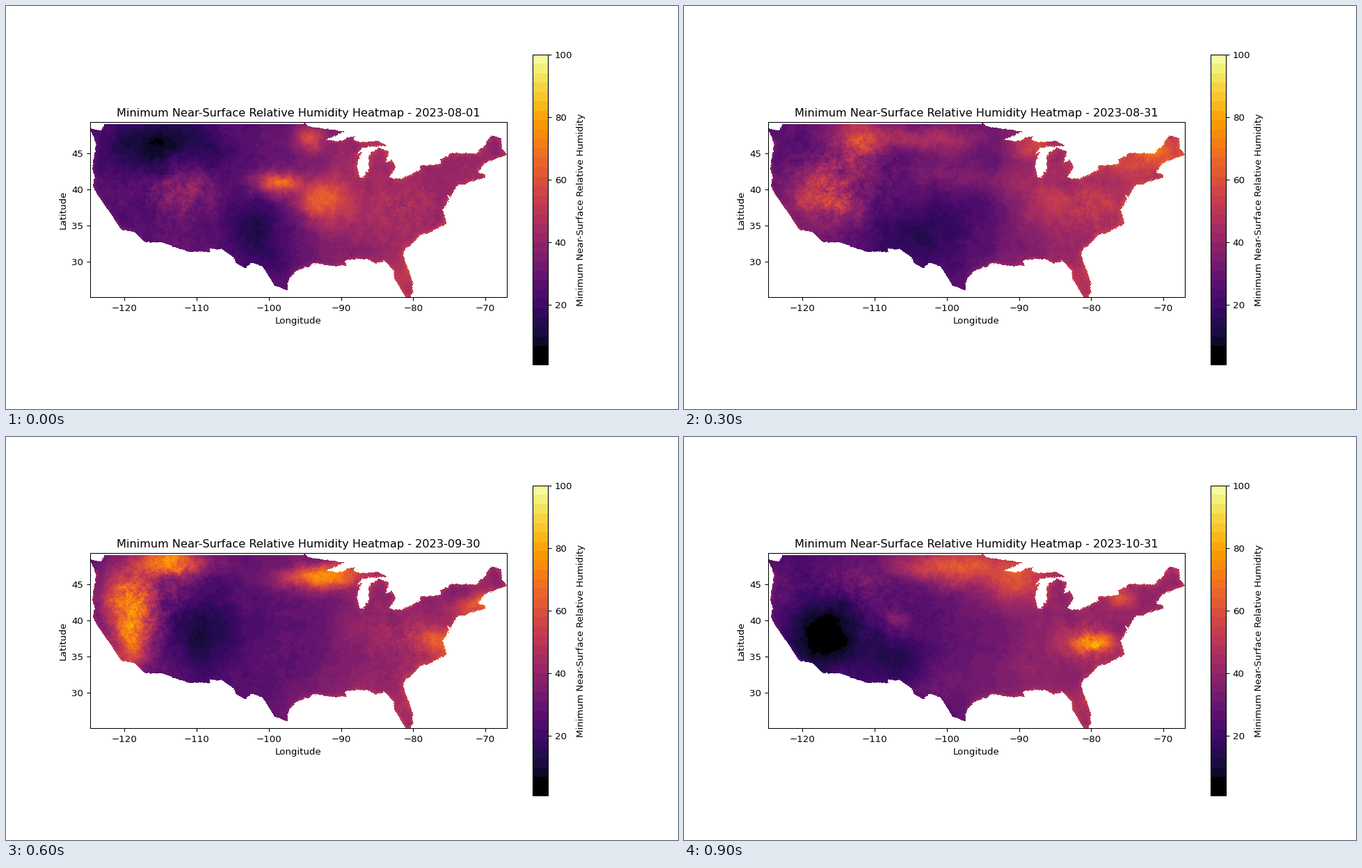
Recreate the animation shown at these times as a matplotlib script. Size 966 by 580 pixels, loop 1 s.

```python
import matplotlib.pyplot as plt
import numpy as np
from matplotlib.animation import FuncAnimation
from matplotlib.cm import ScalarMappable
from matplotlib.colors import ListedColormap, Normalize
from matplotlib.path import Path

WEST, EAST, SOUTH, NORTH = -124.767, -67.058, 25.067, 49.4
NX, NY = 599, 253
LABEL = "Minimum Near-Surface Relative Humidity"
DATES = ["08-01", "08-11", "08-21", "08-31", "09-10",
         "09-20", "09-30", "10-10", "10-20", "10-31"]

lon, lat = np.meshgrid(
    WEST + (np.arange(NX) + 0.5) / NX * (EAST - WEST),
    NORTH - (np.arange(NY) + 0.5) / NY * (NORTH - SOUTH))
freq = np.hypot(np.fft.fftfreq(NY)[:, None], np.fft.rfftfreq(NX))
freq[0, 0] = 1e-9


def smooth(field, response):
    return np.fft.irfft2(np.fft.rfft2(field) * response, s=(NY, NX))


def noise(seed, power):
    """Fractal noise with unit spread; a higher power is smoother."""
    white = np.random.default_rng(seed).standard_normal((NY, NX))
    field = smooth(white - white.mean(), freq ** -power)
    return (field - field.mean()) / field.std()


# Key points of the outline, clockwise from the north-west corner.
NORTH_BORDER = [
    (-124.75, 48.38), (-123.1, 48.15), (-122.8, 49), (-95.15, 49),
    (-95.15, 49.39), (-94.6, 48.75), (-92, 48.3), (-89.5, 48),
    (-92.1, 46.8), (-90.4, 46.6), (-88, 47.45), (-88.4, 46.9),
    (-87.4, 46.5), (-85, 46.75), (-83.7, 46.1)]
LAKES = [
    (-84.7, 45.95), (-87, 45.75), (-88, 44.6), (-87.05, 45.25),
    (-87.85, 43.3), (-87.5, 41.7), (-87, 41.65), (-86.2, 42.9),
    (-86.2, 44.7), (-84.8, 45.78), (-83.4, 45.2), (-83.9, 43.7),
    (-82.95, 44.05), (-82.45, 43), (-83.4, 41.75), (-82.7, 41.45),
    (-81.7, 41.5), (-79, 42.7), (-79.05, 43.27), (-76.2, 43.55),
    (-76.3, 44.1), (-74.7, 45)]
ATLANTIC = [
    (-71.5, 45), (-70.4, 45.8), (-69.2, 47.45), (-67.8, 47.07),
    (-67.8, 45.7), (-67.05, 44.8), (-70.2, 43.6), (-71, 42.3),
    (-70.1, 42.05), (-69.95, 41.65), (-71.9, 41.1), (-74, 40.5),
    (-74.9, 38.95), (-75.4, 39.3), (-75.1, 38.6), (-75.95, 37.2),
    (-75.5, 35.3), (-77.95, 33.9), (-78.9, 33.7), (-81.1, 31.8),
    (-81.4, 30.9), (-80.55, 28.4), (-80.1, 27), (-80.1, 25.8),
    (-80.4, 25.1)]
GULF = [
    (-81.1, 25.1), (-82.7, 27.7), (-82.7, 28.7), (-84, 30.1),
    (-85.2, 29.7), (-86.5, 30.4), (-89.6, 30.2), (-89.2, 29.4),
    (-91, 29.3), (-93.8, 29.7), (-96.6, 28.35), (-97.4, 27),
    (-97.3, 25.97), (-99.1, 26.5), (-100.8, 29.2), (-102.3, 29.87),
    (-103.2, 29), (-104.6, 29.8), (-104.9, 30.6), (-106.6, 31.77)]
PACIFIC = [
    (-108.2, 31.77), (-108.2, 31.4), (-111.1, 31.4), (-114.8, 32.6),
    (-117.1, 32.6), (-118.5, 34), (-120.5, 34.45), (-121.9, 36.6),
    (-123.8, 39.3), (-124.35, 40.4), (-124.1, 41.5), (-124.5, 42.85),
    (-123.95, 46.2), (-124.7, 48.2)]

outline = Path(NORTH_BORDER + LAKES + ATLANTIC + GULF + PACIFIC)
rough = 0.06 * noise(3, 0.8) * (lat < 48.6)
land = outline.contains_points(
    np.column_stack([(lon + rough).ravel(), (lat - rough).ravel()]))
land = land.reshape(lon.shape)

# Warped coordinates give the weather ragged edges.
warp_x, warp_y = lon + 0.5 * noise(1, 1.4), lat + 0.4 * noise(2, 1.4)


def bump(x, y, width, height):
    return np.exp(-((warp_x - x) / width) ** 2 - ((warp_y - y) / height) ** 2)


# Dry west, moister east, sea air along the coasts.
sea_air = 1 - smooth(land, np.exp(-(16 * freq) ** 2))
sea_air *= (lat < 47) & (abs(lon + 108) > 10.5)
climate = (34 + 7 * np.tanh((lon + 92) / 5) + 18 * sea_air
           + 8 * bump(-81.5, 28, 2.5, 3))


def weather(*systems):
    """Climate plus moist and dry areas: lon, lat, width, height, change."""
    return climate + sum(change * bump(*place) for *place, change in systems)


days = {
    "08-01": weather(
        (-115, 46.5, 8, 4, -16), (-101, 34.5, 4.5, 5, -13),
        (-98.3, 41.3, 3, 1.6, 42), (-92.5, 38.5, 3.5, 3, 34),
        (-112, 39.5, 5, 2.5, 14), (-94, 47.4, 2, 2, 28)),
    "08-21": weather(
        (-117.5, 40.5, 5, 6, 44), (-112, 47.5, 4, 2.5, 38),
        (-102, 47.4, 7, 2, 42), (-104.5, 42, 5, 3, -20),
        (-101, 36, 6, 6, -14), (-89.5, 41, 5, 3, 18), (-80, 43.5, 5, 1.5, 20)),
    "09-10": weather(
        (-118, 44.5, 5, 3, -14), (-108, 33, 7, 4, -17),
        (-101, 42.3, 6, 2.5, 34), (-116, 37.5, 4, 1, 24),
        (-88, 46, 3, 1.5, 38), (-72, 44.5, 5, 3, 40), (-81, 38, 6, 3.5, 20)),
    "09-30": weather(
        (-120, 42.5, 4, 5, 46), (-113.5, 48.2, 5, 1.8, 42),
        (-119, 36, 2.5, 3, 30), (-108.5, 38.5, 6, 6, -17),
        (-92.5, 46.3, 5, 1.6, 44), (-77, 37, 3, 2.5, 22),
        (-72, 41.8, 3, 1.5, 24)),
    "10-10": weather(
        (-122.7, 44, 2.2, 6, 48), (-118, 46.5, 3.5, 2.5, 32),
        (-113.5, 37, 6, 4, -15), (-105, 41, 3.5, 4, -19),
        (-88, 39.5, 9, 2.5, -20), (-84.7, 44, 1.5, 1.8, 32),
        (-98, 28, 4, 2.5, 38), (-83, 33, 4, 2, -18)),
    "10-20": weather(
        (-123, 46.8, 2, 2.5, 46), (-112, 34, 7, 5, -18),
        (-102, 37.5, 5, 6, -20), (-93, 35, 5, 5, -16),
        (-83, 41.5, 5, 4.5, 32), (-72, 43.5, 4, 3, 30),
        (-110, 44, 9, 2.5, -6)),
    "10-31": weather(
        (-117, 37.5, 6, 5, -24), (-106, 35, 5, 4, -12),
        (-99, 48, 7, 2.5, 34), (-90.5, 45.5, 4, 3, 16),
        (-106.3, 39.8, 1.5, 1.5, 12), (-80, 36.5, 3, 1.6, 38),
        (-76.5, 43, 2, 1.5, 20)),
}

# Other dates lie halfway between their neighbours.
for before, date, after in zip(DATES, DATES[1:], DATES[2:]):
    if date not in days:
        days[date] = (days[before] + days[after]) / 2

relief = noise(7, 1.0)
ruggedness = 0.03 + 0.11 * bump(-114, 41, 8, 7) + 0.04 * bump(-81, 37.5, 3, 3)


def humidity(i):
    field = days[DATES[i]] + 2.2 * noise(20 + i, 1.5)
    return np.ma.array(np.clip(field * (1 + ruggedness * relief), 1.5, 99),
                       mask=~land)


# Bands of three percent, the two driest almost black.
band_colors = plt.get_cmap("inferno")((np.arange(33) + 0.5) / 33)
band_colors[:2, :3] = 0, 0, 0.015
bands = ListedColormap(band_colors)
scale = Normalize(1, 100)

fig, ax = plt.subplots(figsize=(10, 6.00415), dpi=96.6)
image = ax.imshow(humidity(0), cmap=bands, norm=scale, interpolation="nearest",
                  extent=(WEST, EAST, SOUTH, NORTH))
ax.set(xlabel="Longitude", ylabel="Latitude", yticks=range(30, 50, 5))
title = ax.set_title("")
fig.colorbar(ScalarMappable(scale, bands), ax=ax, label=LABEL,
             ticks=range(20, 101, 20))


def draw(i):
    image.set_data(humidity(i))
    title.set_text(f"{LABEL} Heatmap - 2023-{DATES[i]}")
    return image, title


animation = FuncAnimation(fig, draw, frames=len(DATES), interval=100, repeat=True)
plt.show()
```
